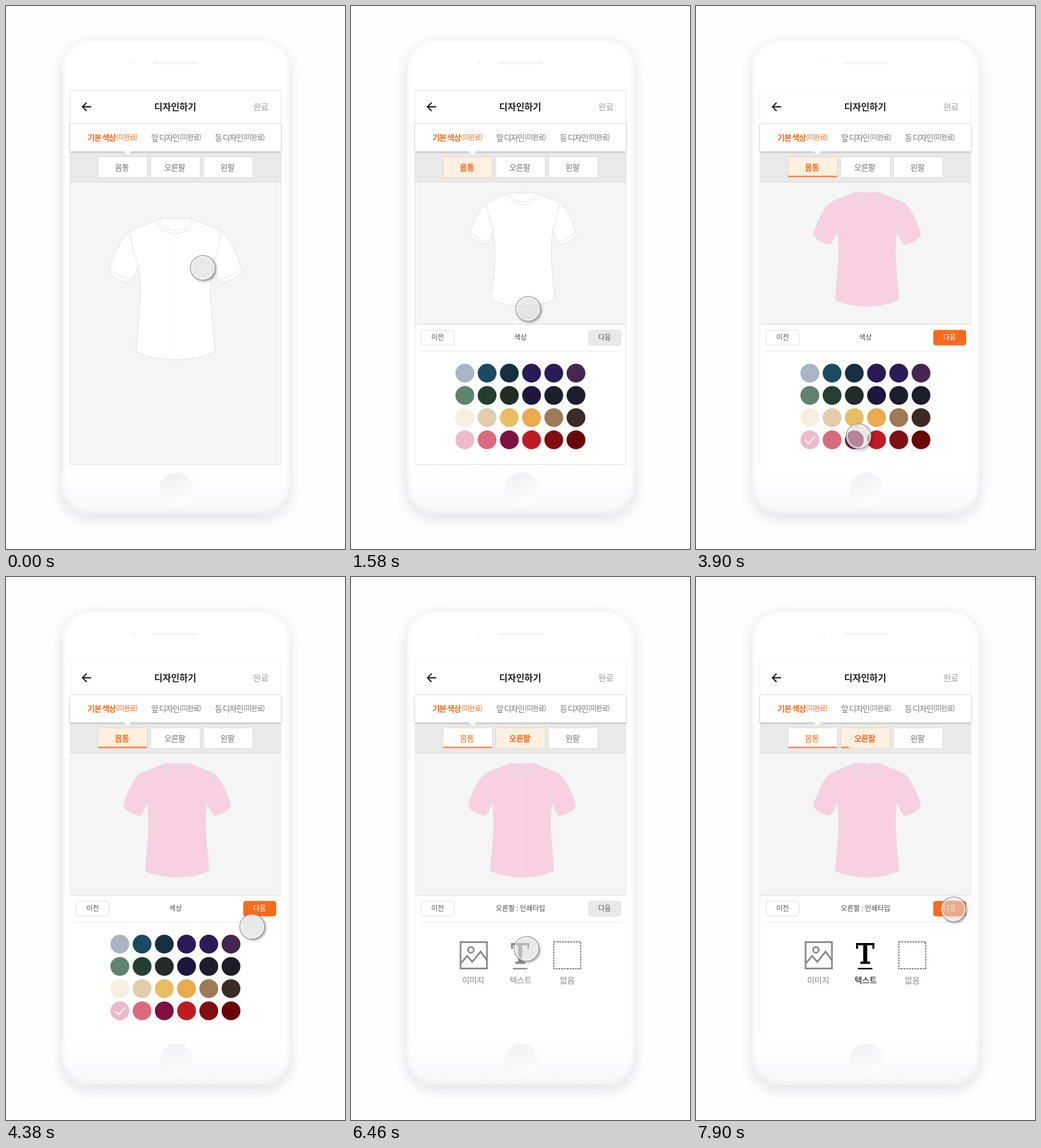
An HTML page with a canvas for the animation above (8000 ms loop, 591 by 948 pixels).

```html
<!DOCTYPE html>
<html lang="ko">
<head>
<meta charset="utf-8">
<style>
html, body { margin: 0; width: 100%; height: 100%; overflow: hidden; background: #fff; }
canvas { display: block; }
</style>
</head>
<body>
<canvas id="stage" width="591" height="948"></canvas>
<script>
const ctx = document.getElementById('stage').getContext('2d');
const LOOP = 8000;
const FONT = '"Noto Sans CJK KR", "Noto Sans KR", "Noto Sans CJK JP", "Noto Sans CJK", sans-serif';
const ORANGE = '#ff6a1a';
const SWATCHES = [
  ['#a9b4c4', '#1a4b61', '#16303f', '#281a56', '#291c58', '#452651'],
  ['#5f836c', '#243f31', '#232c26', '#1f1640', '#1c1e2c', '#1c1d2b'],
  ['#f7eee0', '#e1ccac', '#e8be65', '#eaaa4d', '#9e7a57', '#3b2a26'],
  ['#edbac9', '#da6b7f', '#801042', '#c01b22', '#7f0d11', '#6a0407']
];
const PRESSES = [[640, 1500], [2760, 3960], [4940, 5880], [6600, 7360]];
const MOVES = [
  { from: 1460, to: 2260, path: [[343, 457], [295, 558], [246, 658], [198, 759]] },
  { from: 3800, to: 4560, path: [[198, 759], [360, 759], [385, 699], [445, 579]] },
  { from: 5840, to: 6460, path: [[445, 579], [399, 602], [352, 626], [306, 649]] },
  { from: 7300, to: 7910, path: [[306, 649], [354, 626], [401, 603], [449, 580]] }
];

const clamp = v => Math.max(0, Math.min(1, v));
const progress = (t, from, to) => clamp((t - from) / (to - from));
const easeOut = (p, power) => 1 - Math.pow(1 - p, power);
const mix = (a, b, p) => a + (b - a) * p;

function bezier(path, s) {
  const r = 1 - s, w = [r * r * r, 3 * r * r * s, 3 * r * s * s, s * s * s];
  return [0, 1].map(axis => path.reduce((sum, pt, i) => sum + pt[axis] * w[i], 0));
}

function rect(x, y, w, h, color) {
  ctx.fillStyle = color;
  ctx.fillRect(x, y, w, h);
}

function box(x, y, w, h, r, fill, stroke) {
  ctx.beginPath();
  ctx.roundRect(x + .5, y + .5, w - 1, h - 1, r);
  ctx.fillStyle = fill;
  ctx.fill();
  ctx.strokeStyle = stroke;
  ctx.lineWidth = 1;
  ctx.stroke();
}

function disc(x, y, r, fill) {
  ctx.beginPath();
  ctx.arc(x, y, r, 0, 7);
  ctx.fillStyle = fill;
  ctx.fill();
}

function line(points, color, width) {
  ctx.beginPath();
  points.forEach(([x, y]) => ctx.lineTo(x, y));
  ctx.strokeStyle = color;
  ctx.lineWidth = width;
  ctx.stroke();
}

// y is the optical middle of the Hangul glyphs
function text(str, x, y, size, color, { weight = 400, align = 'center', spacing = 0 } = {}) {
  ctx.font = `${weight} ${size}px ${FONT}`;
  ctx.letterSpacing = spacing + 'px';
  ctx.textAlign = align;
  ctx.fillStyle = color;
  ctx.fillText(str, x, y + size * .37);
}

function phone() {
  rect(0, 0, 591, 948, '#fefefe');
  const body = new Path2D();
  body.roundRect(97, 57, 398, 830, 50);
  ctx.save();
  ctx.shadowColor = 'rgba(40,40,60,.13)';
  ctx.shadowBlur = 24;
  ctx.shadowOffsetY = 9;
  ctx.fillStyle = '#fff';
  ctx.fill(body);
  ctx.restore();

  ctx.save();
  ctx.clip(body);
  const shade = ctx.createLinearGradient(0, 800, 0, 887);
  shade.addColorStop(0, '#fff');
  shade.addColorStop(.45, '#fdfdfe');
  shade.addColorStop(1, '#f7f7fa');
  rect(97, 57, 398, 830, shade);
  ctx.shadowColor = 'rgba(60,60,80,.12)';
  ctx.shadowBlur = 9;
  ctx.strokeStyle = '#f3f3f5';
  ctx.lineWidth = 3;
  ctx.stroke(body);
  ctx.restore();

  ctx.beginPath();
  ctx.roundRect(257, 97.5, 77, 4, 2);
  ctx.fillStyle = '#f4f4f4';
  ctx.fill();
  disc(223, 99.5, 2.5, '#f4f4f4');
  const home = ctx.createLinearGradient(285, 815, 305, 873);
  home.addColorStop(0, '#f2f2f5');
  home.addColorStop(1, '#fdfdfe');
  disc(297, 844, 29.5, home);
}

function tab(label, x, active) {
  const color = active ? ORANGE : '#777';
  text(label, x, 230, 14, color, { weight: active ? 700 : 400, align: 'left', spacing: -1.15 });
  text('(미완료)', x + 50, 230, 12, color, { align: 'left', spacing: -.9 });
}

function partButton(label, x, active, done) {
  box(x, 263, 87, 37, 2, active ? '#fff0e0' : '#fff', active ? '#e4d6c8' : '#dcdcdc');
  text(label, x + 42, 281.5, 14, active || done ? ORANGE : '#777',
    { weight: active ? 700 : 400, spacing: -.7 });
}

function screen(t) {
  rect(112, 148, 367, 652, '#fff');
  rect(112, 307, 367, 493, '#f5f5f5');
  rect(112, 254, 367, 53, '#e9e9e9');
  rect(112, 307, 367, 1, '#d8d8d8');
  ctx.save();
  ctx.shadowColor = 'rgba(0,0,0,.28)';
  ctx.shadowBlur = 3;
  ctx.shadowOffsetY = 1;
  rect(111, 206, 369, 48, '#fff');
  ctx.restore();
  rect(111, 205, 369, 1, '#dedede');

  ctx.beginPath();
  ctx.moveTo(205, 253);
  ctx.lineTo(212, 261);
  ctx.lineTo(219, 253);
  ctx.fillStyle = '#fff';
  ctx.fill();
  line([[206, 254.5], [212, 261], [218, 254.5]], '#d8d8d8', .8);

  line([[133.5, 176], [148.5, 176]], '#111', 2);
  line([[140.5, 168.8], [133.3, 176], [140.5, 183.2]], '#111', 2);
  text('디자인하기', 295, 176, 16, '#222', { weight: 700 });
  text('완료', 444.5, 177, 14.5, '#a0a0a0');
  tab('기본 색상', 142, true);
  tab('앞 디자인', 253, false);
  tab('등 디자인', 364, false);

  const second = t >= 5120;
  partButton('몸통', 160, t >= 840 && !second, second);
  partButton('오른팔', 252, second);
  partButton('왼팔', 344, false);
  const bar = (x, width) => rect(x, 296.5, width, 2, ORANGE);
  if (t >= 2900) bar(161, 85 * easeOut(progress(t, 2880, 3320), 2));
  if (t >= 6760) bar(253, 13.5 * easeOut(progress(t, 6740, 7180), 2));
}

function shirt(cx, top, k, pink) {
  ctx.save();
  ctx.translate(cx, top);
  ctx.scale(k, k);
  ctx.lineJoin = 'round';
  ctx.strokeStyle = pink ? '#e3dce0' : '#e0e0e0';
  ctx.lineWidth = (pink ? 1.5 : 1) / k;

  const outline = new Path2D(), seams = new Path2D();
  outline.moveTo(-29, 1);
  outline.quadraticCurveTo(0, 2, 29, 1);
  for (const side of [1, -1]) {
    const p = (x, y) => [side * x, y];
    const half = side > 0 ? outline : new Path2D();
    if (side < 0) half.moveTo(...p(29, 1));
    half.lineTo(...p(33, 4));
    half.quadraticCurveTo(...p(55, 12), ...p(80, 23));
    half.bezierCurveTo(...p(97, 39), ...p(109, 67), ...p(116.5, 93));
    half.quadraticCurveTo(...p(105, 110), ...p(80, 113.5));
    half.quadraticCurveTo(...p(70, 100), ...p(64.5, 83));
    half.bezierCurveTo(...p(58, 135), ...p(62, 155), ...p(69, 234));
    half.quadraticCurveTo(...p(40, 247), 0, 248);
    if (side < 0) {
      half.lineTo(0, 1.5);
      half.closePath();
      outline.lineTo(0, 1.5);
      outline.closePath();
      ctx.fillStyle = pink ? '#f8d0e1' : '#fff';
      ctx.fill(half);
      ctx.fill(outline);
    }
    seams.moveTo(...p(29, 1));
    seams.lineTo(...p(33, 4));
    seams.quadraticCurveTo(...p(55, 12), ...p(80, 23));
    seams.bezierCurveTo(...p(97, 39), ...p(109, 67), ...p(116.5, 93));
    seams.quadraticCurveTo(...p(105, 110), ...p(80, 113.5));
    seams.quadraticCurveTo(...p(70, 100), ...p(64.5, 83));
    seams.bezierCurveTo(...p(58, 135), ...p(62, 155), ...p(69, 234));
    seams.quadraticCurveTo(...p(40, 247), 0, 248);
    seams.moveTo(...p(80, 23));
    seams.bezierCurveTo(...p(76, 40), ...p(75, 60), ...p(64.5, 83));
    if (!pink) {
      seams.moveTo(...p(114.5, 87));
      seams.quadraticCurveTo(...p(102, 102), ...p(77, 107.5));
    }
  }
  seams.moveTo(-29, 1);
  seams.quadraticCurveTo(0, 2, 29, 1);
  seams.moveTo(-33, 4);
  seams.bezierCurveTo(-28, 35, 28, 35, 33, 4);
  seams.moveTo(-28, 2);
  seams.bezierCurveTo(-24, 28, 24, 28, 28, 2);
  ctx.stroke(seams);
  ctx.restore();
}

function swatches(checked) {
  SWATCHES.forEach((row, j) => row.forEach((color, i) =>
    disc(198.5 + 38.75 * i, 641 + 38.8 * j, 16.4, color)));
  if (checked) line([[190.5, 758], [196.5, 764], [207.5, 751.5]], '#fff', 2.2);
}

function printTypes(textChosen) {
  const gray = '#8a8a8a', ink = textChosen ? '#000' : gray;
  ctx.strokeStyle = gray;
  ctx.lineWidth = 3;
  ctx.strokeRect(191, 637.5, 46, 46);
  ctx.beginPath();
  ctx.arc(209, 651, 5, 0, 7);
  ctx.stroke();
  line([[192, 674], [202.5, 661.5], [211.5, 672], [226, 654], [237, 669]], gray, 3);

  rect(279, 639, 32, 4, ink);
  rect(279, 639, 3.5, 10, ink);
  rect(307.5, 639, 3.5, 10, ink);
  rect(291.5, 639, 7, 36, ink);
  rect(286.5, 671.5, 17, 4, ink);
  rect(282, 682.5, 25.5, 2.5, ink);

  ctx.save();
  ctx.setLineDash([3.2, 1.6]);
  ctx.strokeStyle = '#777';
  ctx.lineWidth = 2;
  ctx.strokeRect(353.5, 637, 47, 47);
  ctx.restore();

  text('이미지', 213, 704, 14, '#888', { weight: 500 });
  text('텍스트', 296, 704, 14, textChosen ? '#000' : '#888', { weight: 500 });
  text('없음', 377, 704, 14, '#888', { weight: 500 });
}

function panel(t, shown) {
  const second = t >= 5120;
  const ready = second ? t >= 6760 : t >= 2900;
  ctx.save();
  ctx.beginPath();
  ctx.rect(112, 500, 368, 310);
  ctx.clip();
  ctx.globalAlpha = shown;
  ctx.translate(0, 47 * (1 - shown));
  rect(112, 555, 367, 245, '#fff');
  rect(112, 555, 367, 1, '#d6d6d6');
  rect(120, 602, 351, 1, '#e8e8e8');
  box(121.5, 565.5, 58.5, 27, 4, '#fff', '#dcdcdc');
  text('이전', 151, 578.5, 12, '#555');
  box(413.5, 565.5, 57.5, 27, 4, ready ? ORANGE : '#e9e9e9', ready ? ORANGE : '#dcdcdc');
  text('다음', 442, 578.5, 12, ready ? '#fff' : '#555');
  text(second ? '오른팔 : 인쇄타입' : '색상', 295.5, 578.5, 12, '#444', { weight: 500 });
  if (second) printTypes(ready);
  else swatches(ready);
  ctx.restore();
}

function screenBorder(t) {
  const firm = '#e2e2e2', faint = '#f3f3f3', late = t >= 2900;
  rect(111, 147, 369, 1, late ? '#fbfbfb' : firm);
  for (const x of [111, 479]) {
    rect(x, 147, 1, 408, late ? '#eee' : firm);
    rect(x, 555, 1, 246, late ? faint : firm);
  }
  if (t < 840 || (t >= 1120 && !late)) rect(111, 800, 369, 1, firm);
}

function cursor(t) {
  const move = MOVES.filter(m => t >= m.from).pop() || MOVES[0];
  const [x, y] = bezier(move.path, easeOut(progress(t, move.from, move.to), 1.65));
  const pressed = PRESSES.some(([from, to]) => t >= from && t < to);
  ctx.save();
  ctx.beginPath();
  ctx.rect(0, 0, 591, 948);
  ctx.arc(x, y, 21, 0, Math.PI * 2);
  ctx.clip('evenodd');
  ctx.shadowColor = pressed ? 'rgba(0,0,0,.3)' : 'rgba(0,0,0,.45)';
  ctx.shadowBlur = pressed ? 6 : 4;
  ctx.shadowOffsetX = ctx.shadowOffsetY = pressed ? 2.5 : 2;
  disc(x, y, 21.5, '#aaa');
  ctx.restore();

  disc(x, y, 21, 'rgba(218,218,218,.58)');
  ctx.beginPath();
  ctx.arc(x, y, 19.8, 0, 7);
  ctx.strokeStyle = 'rgba(255,255,255,.75)';
  ctx.lineWidth = 1.8;
  ctx.stroke();
  ctx.beginPath();
  ctx.arc(x, y, 21.5, 0, 7);
  ctx.strokeStyle = '#a6a6a6';
  ctx.lineWidth = 1.5;
  ctx.stroke();
}

function draw(t) {
  const shown = easeOut(progress(t, 820, 1120), 2);
  phone();
  screen(t);
  if (t >= 2900) shirt(298.3, 325, .803, true);
  else shirt(mix(295.5, 300, shown), mix(370, 325, shown), mix(1, .803, shown), false);
  screenBorder(t);
  if (shown > 0) panel(t, shown);
  cursor(t);
}

function tick() {
  draw(performance.now() % LOOP);
  requestAnimationFrame(tick);
}
tick();
</script>
</body>
</html>
```
